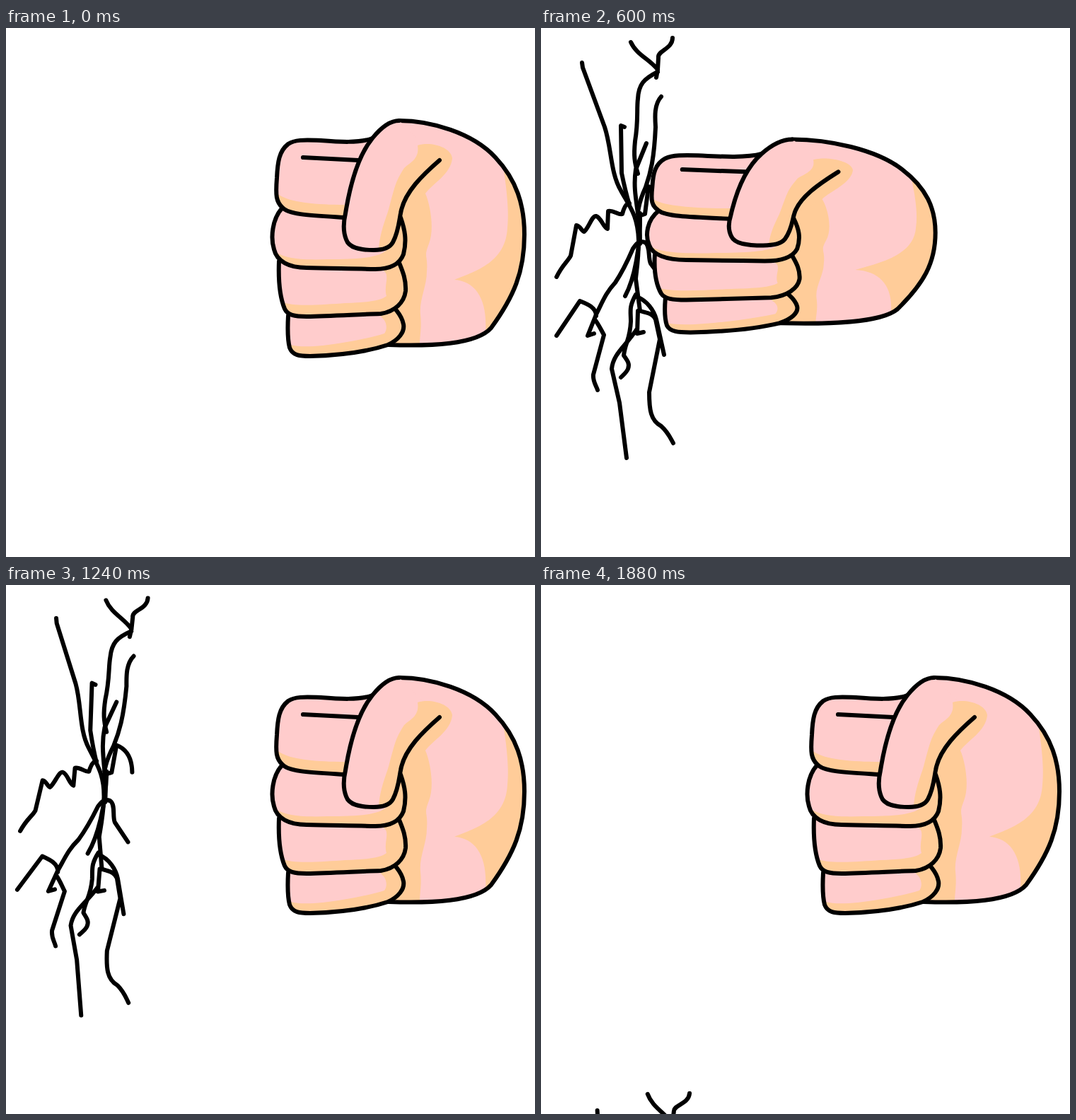
An HTML page for the animation above (1920 ms loop, 748 by 748 pixels).

```html
<!DOCTYPE html>
<html lang="en">
<head>
<meta charset="utf-8">
<title>Punch</title>
<style>
html, body { margin: 0; width: 100%; height: 100%; overflow: hidden; background: #fff; }
svg { display: block; width: 100%; height: 100%; }
.line { fill: none; stroke: #000; stroke-width: 6; stroke-linecap: round; stroke-linejoin: round; }
#fist .line { vector-effect: non-scaling-stroke; }
.skin { fill: #fcc; }
.shade { fill: #fc9; }
</style>
</head>
<body>
<svg viewBox="0 0 748 748">
  <g id="cracks" class="line">
    <path d="M127 20C135 38 155 45 165 59M186 14C186 30 164 32 166 42L165 59 163 70"/>
    <path d="M165 62C145 72 138 80 137 100C135 115 138 130 133 160C131 180 132 190 137 206"/>
    <path d="M58 49L59 56 90 140C100 170 98 205 113 230C125 252 137 265 138 300C138 330 134 350 134 355L140 400"/>
    <path d="M170 97C160 108 161 125 162 140C160 185 155 205 148 225C142 238 138 250 137 262"/>
    <path d="M118 140L113 138 114 205C118 225 122 240 125 250"/>
    <path d="M149 163L134 200C131 220 133 235 137 262C140 280 140 290 140 305"/>
    <path d="M176 261C175 245 170 230 152 224L147 263 138 266"/>
    <path d="M22 352C30 335 38 330 42 322L50 279C55 279 58 288 61 288C68 282 72 265 78 266C85 268 88 282 94 284L95 259C102 257 110 265 115 263C117 255 120 248 125 248"/>
    <path d="M175 360L155 333C151 325 155 308 147 303C138 300 134 306 130 312C120 335 115 345 105 360C92 374 88 385 78 405L66 435 75 432"/>
    <path d="M140 262C141 310 132 355 119 379"/>
    <path d="M22 435L55 386C65 390 78 395 78 407M76 412C82 420 84 425 89 434L74 490C73 500 78 505 80 512"/>
    <path d="M134 377C124 395 127 400 127 415C126 440 119 445 117 463C122 470 126 475 123 482C121 487 117 490 113 494"/>
    <path d="M135 380C150 385 160 400 163 412L174 462M140 400C150 403 158 403 162 412L168 440 153 515C153 540 155 555 170 563C180 572 183 580 187 587"/>
    <path d="M137 400L136 432 145 430M136 425C120 450 102 460 100 482L111 530 121 608"/>
  </g>
  <g id="fist">
    <!-- palm -->
    <path class="skin" d="M556 131C600 131 660 148 692 183C722 215 733 250 733 292C733 345 718 380 686 424C665 448 600 450 541 448L500 400V200Z"/>
    <path class="shade" d="M704 203C709 235 711 262 709 282C707 330 667 343 634 356C665 358 681 385 678 430L686 424C718 380 733 345 733 292C733 255 724 222 704 203Z"/>
    <path class="shade" d="M593 234C600 250 606 285 598 305C590 325 597 320 595 345C595 365 584 385 586 405C588 425 585 435 585 448L541 448 520 400V260Z"/>
    <path class="line" d="M556 131C600 131 660 148 692 183C722 215 733 250 733 292C733 345 718 380 686 424C665 448 600 450 541 448"/>
    <!-- fingers, bottom to top -->
    <path class="skin" d="M399 407C398 425 398 440 401 452C405 463 415 464 430 464C470 463 510 458 540 448C555 441 564 430 562 419C560 408 554 402 551 398Z"/>
    <path class="shade" d="M402 448C420 453 450 449 470 446C495 442 520 437 535 432C540 425 538 415 532 410L527 404 551 398C554 402 560 408 562 419C564 430 555 441 540 448C510 458 470 463 430 464C412 464 404 462 402 448Z"/>
    <path class="line" d="M399 407C398 425 398 440 401 452C405 463 415 464 430 464C470 463 510 458 540 448C555 441 564 430 562 419C560 408 554 402 551 398"/>
    <path class="skin" d="M386 330C385 355 387 380 394 397C398 406 408 408 425 408C460 407 500 405 530 404C550 401 563 388 565 372C566 355 560 342 556 332Z"/>
    <path class="shade" d="M390 387C405 395 450 391 480 389C510 388 530 386 538 379C534 365 542 352 536 345L530 340 556 332C560 342 566 355 565 372C563 388 550 401 530 404C500 405 460 407 425 408C408 408 397 406 394 397Z"/>
    <path class="line" d="M386 330C385 355 387 380 394 397C398 406 408 408 425 408C460 407 500 405 530 404C550 401 563 388 565 372C566 355 560 342 556 332"/>
    <path class="skin" d="M391 254C376 270 374 297 379 313C383 330 400 339 425 339C460 340 490 340 522 341C540 341 556 336 562 320C567 300 564 285 558 268Z"/>
    <path class="shade" d="M381 316C395 328 430 328 455 327C500 327 530 325 540 312L558 268C564 285 567 300 562 320C556 336 540 341 522 341L425 339C400 339 385 328 381 316Z"/>
    <path class="line" d="M391 254C376 270 374 297 379 313C383 330 400 339 425 339C460 340 490 340 522 341C540 341 556 336 562 320C567 300 564 285 558 268"/>
    <path class="skin" d="M518 156C500 163 470 161 445 159C420 158 408 158 399 164C386 174 384 190 383 212C381 237 382 246 391 254C400 264 430 265 478 268L520 220Z"/>
    <path class="shade" d="M385 235C400 247 440 250 480 250L478 268C430 265 400 264 391 254C386 250 385 245 385 235Z"/>
    <path class="line" d="M518 156C500 163 470 161 445 159C420 158 408 158 399 164C386 174 384 190 383 212C381 237 382 246 391 254C400 264 430 265 478 268M420 183L498 187"/>
    <!-- thumb -->
    <path class="skin" d="M556 131C540 131 526 146 518 156C497 182 486 225 480 262C477 275 477 289 481 299C485 311 500 314 520 314C532 314 542 312 547 303C555 288 556 272 558 262C563 232 590 207 613 187Z"/>
    <path class="shade" d="M582 166C600 160 629 168 631 184C629 207 603 220 593 234L558 262C556 272 555 288 547 303C543 311 535 313 527 314C528 295 533 280 540 260C550 225 549 220 563 198C572 190 585 185 582 166Z"/>
    <path class="line" d="M556 131C540 131 526 146 518 156C497 182 486 225 480 262C477 275 477 289 481 299C485 311 500 314 520 314C532 314 542 312 547 303C555 288 556 272 558 262C563 232 590 207 613 187"/>
  </g>
</svg>
<script>
const LOOP = 1920, STEP = 40;
const fist = document.getElementById('fist');
const cracks = document.getElementById('cracks');

const clamp = u => Math.max(0, Math.min(1, u));
const mix = (a, b, u) => a + (b - a) * u;
const smooth = u => (1 - Math.cos(Math.PI * u)) / 2;

// Fist poses: x shift, y shift, x scale, y scale
const REST = [0, 0, 1, 1];
const HIT = [-322.6, 0, .959, 1];
const STRETCH = [-319, -5.5, 1.228, .714];
const blend = (a, b, u) => a.map((v, i) => mix(v, b[i], u));

function fistPose(t) {
  if (t < 280) return blend(REST, HIT, clamp((t - 120) / 160));
  if (t < 560) return blend(HIT, STRETCH, (t - 280) / 280);
  return blend(REST, STRETCH, clamp((840 - t) / 280) ** 3);
}

// Crack swing: time, degrees
const SWING = [[1040, 0], [1120, -4], [1370, 10.6], [1440, 10.4], [1600, 4.7]];

function crackAngle(t) {
  let angle = 0;
  for (let i = 1; i < SWING.length; i++) {
    const [t0, a0] = SWING[i - 1], [t1, a1] = SWING[i];
    if (t >= t0) angle = mix(a0, a1, smooth(clamp((t - t0) / (t1 - t0))));
  }
  return angle;
}

// A short hop up, then the drop
function crackDrop(t) {
  const u = clamp((t - 1600) / 280);
  return 697 * u * u * (2.7 * u - 1.7);
}

function draw(now) {
  const t = Math.floor(now % LOOP / STEP) * STEP;
  const [x, y, sx, sy] = fistPose(t);
  fist.setAttribute('transform',
    `translate(${555 + x} ${297 + y}) scale(${sx} ${sy}) translate(-555 -297)`);
  cracks.style.display = t < 320 ? 'none' : '';
  cracks.setAttribute('transform',
    `translate(0 ${crackDrop(t)}) rotate(${crackAngle(t)} 104 311)`);
}

const start = performance.now();
function tick(now) {
  draw(Math.max(0, now - start));
  requestAnimationFrame(tick);
}
draw(0);
requestAnimationFrame(tick);
</script>
</body>
</html>
```
